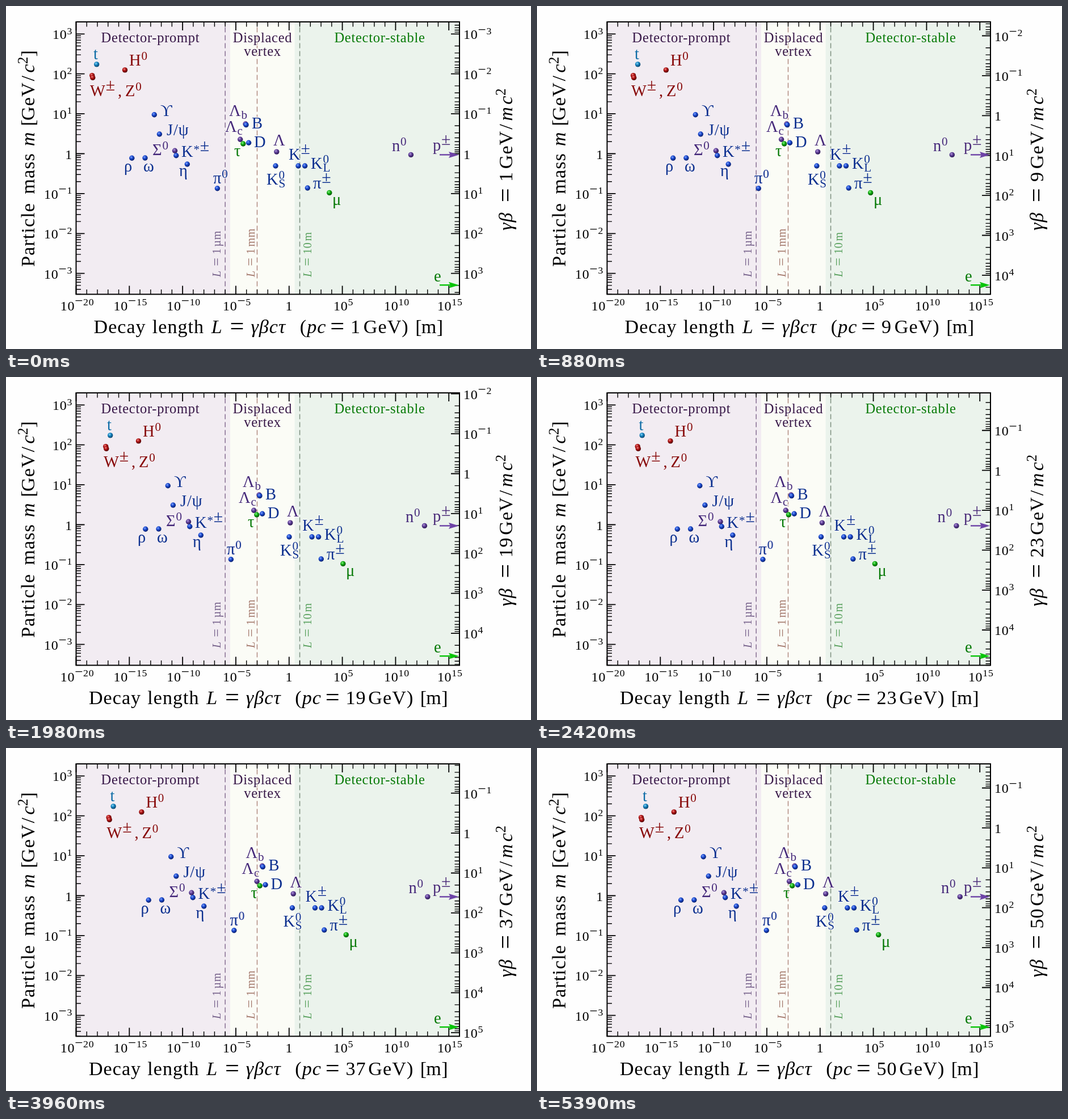
Animation, 925 px wide and 605 px high, one loop 5.5 s. Source, as an HTML page:

```html
<!DOCTYPE html>
<html lang="en">
<head>
<meta charset="utf-8">
<title>Particle decay lengths</title>
<style>
html, body { margin: 0; width: 100%; height: 100%; overflow: hidden; background: #fefefe; }
svg { display: block; width: 925px; height: 605px; }
text { font-family: "Liberation Serif", "Times New Roman", serif; letter-spacing: .03em; white-space: pre; }
.halo { paint-order: stroke; stroke-width: 2.6px; stroke-linejoin: round; }
</style>
</head>
<body>
<svg id="stage" viewBox="0 0 925 605"></svg>
<script>
const STEP = 110, COUNT = 50;
const X0 = 123.5, X1 = 799, Y0 = 28, Y1 = 508.5;
const DX = (X1 - X0) / 36, DY = 70.4, YONE = 260.5;
const px = k => X0 + (k + 20) * DX;   // x of 10^k metres
const py = k => YONE - k * DY;        // y of 10^k GeV

const BG = { prompt: '#f2ecf2', mid: '#fbfcf6', stable: '#ebf3ec' };
const INK = { blue: '#0b2f8f', red: '#870808', purple: '#45287a', green: '#087a08', teal: '#0d6ca6' };
const BALL = {
  blue: ['#86a8ff', '#1c4bd0', '#071c68'],
  red: ['#f08a8a', '#b01212', '#4c0404'],
  purple: ['#b9a0dd', '#60409a', '#2a1650'],
  green: ['#8df58d', '#12b012', '#045204'],
  teal: ['#8fd6f5', '#1686c2', '#073f66']
};

// "^" raises, "_" lowers, "|" returns to the baseline
const LEVEL = { '^': -.36, '_': .18, '|': 0 };

function rich(s, z) {
  let level = 0, y = 0, dx = 0;
  return [...s].map(c => {
    if (c in LEVEL) {
      if (level < 0 && c === '_') dx = -.4 * z;
      level = LEVEL[c];
      return '';
    }
    const wide = c === '−' || c === '±';
    const scale = c === '=' ? 1.3 : level ? (wide ? 1.05 : .74) : 1;
    const goal = z * (level + (c === '=' ? .07 : c === '*' ? .15 : 0));
    if (scale === 1 && goal === y) return c;
    const span = `<tspan dx="${dx}" dy="${goal - y}" font-size="${z * scale}">${c}</tspan>`;
    y = goal;
    dx = 0;
    return span;
  }).join('');
}

const text = (x, y, s, z, attrs = '') =>
  `<text x="${x}" y="${y}" font-size="${z}" ${attrs}>${rich(s, z)}</text>`;
const line = (x1, y1, x2, y2, w, color = '#000', more = '') =>
  `<line x1="${x1}" y1="${y1}" x2="${x2}" y2="${y2}" stroke="${color}" stroke-width="${w}" ${more}/>`;
const rect = (x, y, w, h, attrs) => `<rect x="${x}" y="${y}" width="${w}" height="${h}" ${attrs}/>`;
const power = k => k === 0 ? '1' : '10^' + (k < 0 ? '−' : '') + Math.abs(k);
const halo = color => `class="halo" stroke="${color}"`;

// Words placed at em offsets; a leading "/" after the offset flag means italic
function row(parts, z, transform, attrs = '') {
  return `<g transform="${transform}" ${attrs}>` + parts.map(([x, s, italic]) =>
    text(x * z, 0, s, z, italic ? 'font-style="italic"' : '')).join('') + '</g>';
}

function xTicks() {
  let out = '';
  for (let k = -20; k <= 16; k++) {
    const x = px(k), big = k % 5 === 0, len = big ? 15 : 8.5, w = big ? 1.8 : 1.4;
    out += line(x, Y1, x, Y1 - len, w) + line(x, Y0, x, Y0 + len, w);
    if (big) out += text(x + (k ? 2 : 0), 537, power(k), 24, 'text-anchor="middle"');
  }
  return out;
}

// Log ticks; dir is +1 to the right of x, -1 to the left, grow the sense of the scale
function logTicks(x, dir, grow, from, to) {
  let out = '';
  for (let k = from; k <= to; k++) for (let n = 1; n < 10; n++) {
    const y = YONE - grow * DY * (k + Math.log10(n));
    out += line(x, y, x + dir * (n > 1 ? 8.5 : 15), y, n > 1 ? 1.4 : 1.8);
  }
  return out;
}

function massLabels() {
  let out = '';
  for (let k = -3; k <= 3; k++) out += text(117, py(k) + 9, power(k), 24, 'text-anchor="end"');
  return out;
}

function regions() {
  return rect(X0, Y0, 271.5, Y1 - Y0, `fill="${BG.prompt}"`) +
    rect(395, Y0, 113.5, Y1 - Y0, `fill="${BG.mid}"`) +
    rect(508.5, Y0, X1 - 508.5, Y1 - Y0, `fill="${BG.stable}"`);
}

function limits() {
  const list = [[-6, '#876f93', 377.5, '1', 'µm', '#75608a'],
                [-3, '#b18a80', 437.5, '1', 'mm', '#a3776b'],
                [1, '#7b8f7e', 537.5, '10', 'm', '#57a05c']];
  return list.map(([k, stroke, x, n, unit, fill]) => {
    const gap = n.length * .5;
    return line(px(k), Y1, px(k), Y0, 1.5, stroke, 'stroke-dasharray="9 5"') +
      row([[0, 'L', 1], [.96, '='], [2.01, n], [2.18 + gap, unit]], 20,
          `translate(${x} 478) rotate(-90)`, `fill="${fill}"`);
  }).join('');
}

function headings() {
  const mid = (x, y, s, fill, bg) =>
    text(x, y, s, 24.5, `text-anchor="middle" fill="${fill}" ${halo(bg)}`);
  return mid(254.5, 64, 'Detector-prompt', '#381848', BG.prompt) +
    mid(452, 64, 'Displaced', '#381848', BG.mid) +
    mid(452, 88, 'vertex', '#381848', BG.mid) +
    mid(658.5, 64, 'Detector-stable', '#087a08', BG.stable);
}

// label, ink, region, label x, baseline, ball x, ball y
const PARTICLES = [
  ['t', 'teal', 'prompt', 154, 94, 159.7, 102.9],
  ['H^0', 'red', 'prompt', 217, 105, 209.5, 112.9],
  ['W^±', 'red', 'prompt', 148, 159, 151.7, 122.6],
  [',', 'red', 'prompt', 197, 159],
  ['Z^0', 'red', 'prompt', 210, 159, 152.8, 126.4],
  ['ϒ', 'blue', 'prompt', 272, 194, 261.3, 191.7],
  ['J/ψ', 'blue', 'prompt', 283, 228, 270.4, 226],
  ['Σ^0', 'purple', 'prompt', 258, 263, 297.5, 255.2],
  ['K^*±', 'blue', 'prompt', 309, 266, 299.8, 263.8],
  ['ρ', 'blue', 'prompt', 208, 292, 221.8, 268.2],
  ['ω', 'blue', 'prompt', 242, 292, 245, 268],
  ['η', 'blue', 'prompt', 305, 300, 319.3, 279],
  ['π^0', 'blue', 'prompt', 365, 313, 372.4, 321.7],
  ['Λ_b', 'purple', 'mid', 393, 194, 422, 208],
  ['Λ_c', 'purple', 'mid', 386, 222, 412.7, 235.3],
  ['B', 'blue', 'mid', 433, 216, 423, 209.6],
  ['D', 'blue', 'mid', 437, 249, 427.6, 241.3],
  ['τ', 'green', 'mid', 402, 265, 417.8, 243],
  ['Λ', 'purple', 'mid', 471, 246, 476.8, 257.1],
  ['K^0_S', 'blue', 'mid', 459, 315, 475, 282],
  ['K^±', 'blue', 'mid', 498, 271, 515, 282],
  ['K^0_L', 'blue', 'stable', 537, 287, 526.6, 282],
  ['π^±', 'blue', 'stable', 541, 322, 531.3, 321],
  ['μ', 'green', 'stable', 575, 351, 569.8, 329.4],
  ['n^0', 'purple', 'stable', 680, 256, 713.4, 262.4]
];

function particles() {
  return PARTICLES.map(([s, ink, zone, x, y]) =>
    text(x, y, s, 28.5, `fill="${INK[ink]}" ${halo(BG[zone])}`)).join('') +
    PARTICLES.filter(p => p.length > 5).map(([, ink, , , , x, y]) =>
      `<circle cx="${x}" cy="${y}" r="4.7" fill="url(#${ink})"/>`).join('');
}

function arrow(y, color) {
  return line(764, y, 784, y, 2.4, color) +
    `<path d="M798 ${y}L780 ${y - 5.5}L783 ${y}L780 ${y + 5.5}Z" fill="${color}"/>`;
}

const defs = `<defs><clipPath id="plot">${rect(X0, Y0 - .8, X1 - X0 + 1, Y1 - Y0 + 1.6, '')}</clipPath>` +
  Object.entries(BALL).map(([id, c]) =>
    `<radialGradient id="${id}" cx=".38" cy=".34" r=".68">` +
    c.map((v, i) => `<stop offset="${[0, .42, 1][i]}" stop-color="${v}"/>`).join('') +
    '</radialGradient>').join('') + '</defs>';

const stage = document.getElementById('stage');
stage.innerHTML = defs + regions() + limits() + headings() + xTicks() +
  `<g clip-path="url(#plot)">${logTicks(X0, 1, 1, -4, 3)}<g id="scale">${logTicks(X1, -1, -1, -5, 6)}</g></g>` +
  rect(X0, Y0, X1 - X0, Y1 - Y0, 'fill="none" stroke="#000" stroke-width="2"') +
  massLabels() +
  row([[0, 'Particle'], [3.74, 'mass'], [6.2, 'm', 1], [7.24, '['], [7.52, 'GeV'], [9.55, '/'],
       [9.98, 'c', 1], [10.43, '^2'], [10.8, ']']], 34.3, 'translate(50 460) rotate(-90)') +
  `<g id="moving">${particles()}</g>` +
  text(752, 255, 'p^±', 28.5, `fill="#4a2a78" ${halo(BG.stable)}`) +
  text(754, 486, 'e', 28.5, `fill="${INK.green}" ${halo(BG.stable)}`) +
  arrow(262.4, '#6d43a6') + arrow(492.2, '#08c408') +
  '<g id="readout"></g>';

const moving = document.getElementById('moving');
const scale = document.getElementById('scale');
const readout = document.getElementById('readout');

function readouts(p, shift) {
  const w = p > 9 ? .5 : 0;
  let out = '';
  for (let k = -4; k <= 6; k++) {
    const y = YONE + DY * (k - shift);
    if (y > Y0 - .5 && y < Y1 + .5) out += text(806, y + 9, power(k), 24);
  }
  const z = 34.1;
  out += row([[0, 'Decay'], [3.03, 'length'], [6.08, 'L', 1], [7.04, '='], [8.12, 'γβcτ', 1],
              [10.65, '('], [11.02, 'pc', 1], [12.22, '='], [13.27, String(p)],
              [13.94 + w, 'GeV'], [15.92 + w, ')'], [16.62 + w, '['], [16.93 + w, 'm'], [17.72 + w, ']']],
             z, `translate(${154.5 - w * z / 2} 577)`);
  out += row([[0, 'γβ', 1], [1.46, '='], [2.52, String(p)], [3.19 + w, 'GeV'], [5.23 + w, '/'],
              [5.67 + w, 'm', 1], [6.52 + w, 'c', 1], [6.98 + w, '^2']],
             z, `translate(892 ${396 + w * z / 2}) rotate(-90)`);
  return out;
}

let shown = 0;
function show(p) {
  if (p === shown) return;
  shown = p;
  const shift = Math.log10(p);
  moving.setAttribute('transform', `translate(${shift * DX} 0)`);
  scale.setAttribute('transform', `translate(0 ${-shift * DY})`);
  readout.innerHTML = readouts(p, shift);
}

const start = performance.now();
function tick() {
  show(1 + Math.floor((performance.now() - start) / STEP) % COUNT);
  requestAnimationFrame(tick);
}
tick();
</script>
</body>
</html>
```
